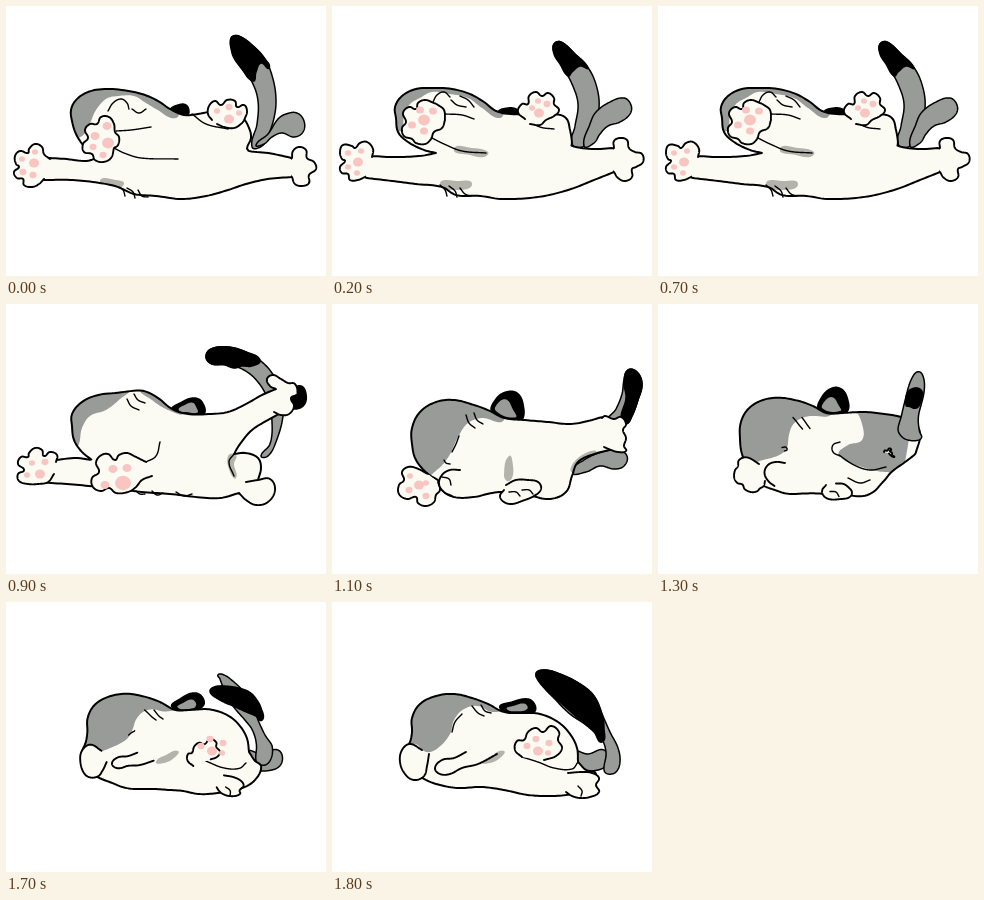
These frames come from a looping animation (320 px wide and 270 px high, 1.9 s). An HTML page with a canvas:

```html
<!DOCTYPE html>
<html lang="en">
<head>
<meta charset="utf-8">
<title>Rolling cat</title>
<style>
html, body { margin: 0; width: 100%; height: 100%; overflow: hidden; background: #fff; }
canvas { display: block; width: 320px; height: 270px; }
</style>
</head>
<body>
<canvas id="stage"></canvas>
<script>
// Part kinds by first letter: G grey, K black, B body, H body patch, S shade,
// P paw (open outline), D pads (x,y,radius), L ink line.
const reach = {
  Gtail: '246,141 251,118 252,95 246,76 235,62 227,50 225,38 226,31 233,30 246,39 259,53 267,73 270,94 268,112 262,130 256,140',
  Ktip: '225,32 232,30 246,39 258,52 263,62 255,57 250,66 247,75 235,61 226,45',
  Grump: '250,139 262,128 272,113 280,108 291,107 298,115 297,126 288,131 276,127 266,131 258,138',
  Kear: '164,104 172,99 180,99 183,106 180,110 168,108',
  B: '66,115 65,104 70,94 82,86 98,83 116,84 136,88 152,95 164,103 178,109 192,108 206,106 236,112 243,122 245,132 241,142 243,145 262,147 286,152 286,152 290,160 286,171 286,171 262,173 240,178 222,184 200,190 176,193 150,190 128,188 112,181 94,177 66,174 38,174 38,174 30,160 42,152 42,152 60,153 80,155 91,152 91,152 78,140 70,128',
  Hhead: '66,130 60,100 80,80 120,80 170,98 170,112 150,103 140,97 128,90 112,90 100,93 90,104 85,115 80,126 72,132',
  Sarm: '94,175 110,174 118,178 108,182',
  Larm: '110,125 125,124 145,121',
  Lelbow: '108,142 118,147 135,152 172,153',
  Leye: '102,105 107,97 115,93 121,97 123,103',
  Lcheek: '126,103 133,107 140,103',
  Lthigh: '186,108 200,118 222,123',
  Lfur1: '112,181 117,184 119,190',
  Lfur2: '121,182 127,186 129,192',
  Lfur3: '132,184 136,190 142,191',
  P1: '44,153 38,148 36,141 29,138 23,143 22,147 14,145 9,150 10,158 13,161 8,166 11,172 17,173 18,179 26,181 33,178 38,173',
  D1: '28,157,5 16,153,3 29,146,3 17,166,3.5 27,169,3.5',
  P2: '108,142 112,139 113,131 109,126 108,118 103,111 95,111 91,118 84,118 79,124 82,132 77,138 78,146 86,148 89,154 97,156 105,152 108,142',
  D2: '102,137,6 101,120,4.5 89,130,4.5 87,141,3.5 97,149,3.5',
  P3: '286,152 287,145 293,141 300,144 301,152 308,156 310,163 303,169 303,177 296,180 289,178 286,171',
  P4: '206,114 202,108 203,100 209,95 215,99 221,94 229,95 231,101 238,99 241,105 239,112 236,117 228,122 218,121 211,118',
  D4: '223,113,5 211,105,3 223,101,3.5 233,107,3'
};

const stretch = {
  Gtail: '240,138 243,120 246,98 240,78 230,60 222,46 222,38 229,36 243,48 257,63 265,82 267,102 262,122 252,140',
  Ktip: '222,38 229,36 243,48 256,62 248,60 240,66 236,70 228,58 222,48',
  Grump: '252,140 258,118 264,106 278,96 292,92 299,99 298,108 288,116 276,120 268,128 262,137',
  Kear: '166,107 176,102 186,104 188,110 176,111',
  B: '64,112 63,101 70,90 84,83 102,82 120,83 138,88 152,96 164,105 178,108 196,108 222,108 234,112 238,124 240,136 240,140 262,143 282,142 282,142 288,150 282,166 282,166 262,174 236,184 206,191 170,193 148,190 124,189 110,181 84,178 52,174 34,172 34,172 28,160 40,150 40,150 60,151 88,150 104,147 104,147 92,144 76,136 66,126',
  Hhead: '64,124 56,100 80,76 120,78 170,100 168,112 150,102 136,92 118,88 100,86 88,92 78,98 72,110 70,124',
  Sarm: '108,178 126,175 140,178 126,184',
  Selbow: '122,143 140,142 156,146 152,151 138,149',
  Larm: '113,108 130,109 142,113',
  Lelbow: '100,132 112,138 130,145 154,147',
  Leye: '101,96 105,89 112,86 118,91',
  Lcheek: '119,94 125,99 134,101',
  Lbrow: '128,90 136,94 142,101',
  Lthigh: '194,113 208,121 222,123',
  Lfur1: '108,179 113,184 115,190',
  Lfur2: '117,180 123,185 125,191',
  Lfur3: '128,182 133,188 139,190',
  P1: '40,151 41,143 35,136 28,137 23,142 20,140 11,139 8,146 10,153 13,155 8,161 10,167 16,168 18,174 26,174 33,171',
  D1: '26,156,5 16,147,3 29,145,3 16,161,3 25,167,3',
  P2: '113,114 112,104 106,99 102,97 93,94 86,97 84,103 77,101 71,107 74,116 70,122 72,130 80,133 84,137 93,138 99,133 102,126 110,122 113,114',
  D2: '92,114,6 101,105,4 88,104,4 80,119,4 92,125,4',
  P3: '282,142 282,135 288,132 295,134 297,142 303,146 310,148 311,156 304,161 300,163 300,171 293,175 286,172 282,166',
  P4: '193,113 186,106 190,98 196,98 197,90 204,86 210,90 216,87 222,92 222,98 227,104 222,110 214,114 208,119 198,118',
  D4: '207,107,5 200,102,3 206,95,3 215,98,3.5'
};

const kick = {
  Gtail: '255,152 264,140 266,118 262,96 252,78 238,66 222,61 206,60 200,53 205,45 222,43 240,48 256,58 268,72 276,90 277,112 270,138 262,152',
  Ktip: '200,53 205,45 222,43 240,48 254,56 246,62 236,62 228,64 216,60 206,60',
  Kend: '280,100 286,86 295,82 300,90 298,101 288,105',
  Kear: '166,107 176,98 188,94 196,98 198,110 186,111',
  Gear: '172,106 179,100 187,98 191,103 192,109 182,109',
  B: '66,122 66,110 76,98 92,91 110,89 126,87 138,87 152,94 166,105 182,110 204,110 222,108 240,100 256,91 270,85 270,85 285,88 280,106 280,106 262,116 246,126 234,140 228,150 228,150 240,149 252,154 255,164 252,176 252,176 256,182 246,194 233,189 233,189 214,194 190,193 165,190 136,188 104,184 60,180 28,178 28,178 30,160 50,156 50,156 70,154 86,156 86,156 76,148 68,136',
  Hhead: '66,142 56,110 80,84 112,84 124,84 114,95 100,106 84,112 76,124 72,142',
  Hback: '134,84 150,86 176,109 162,106 146,96',
  Ship: '222,152 230,151 228,160 230,174 224,168',
  Larm: '140,158 150,152 154,138',
  Leye: '121,95 125,102 133,106',
  Lbrow: '128,90 132,96 139,99',
  Lthigh: '228,150 223,158 228,172',
  Lfur1: '130,187 134,190 139,190',
  Lfur2: '146,187 151,191 157,189',
  Lfur3: '170,188 178,192 186,190',
  P1: '50,158 51,151 44,148 38,152 36,146 29,144 23,149 22,153 15,153 12,160 18,166 12,170 13,177 22,180 32,180 42,178 48,170',
  D1: '34,170,5 26,159,3 39,158,3.5 21,171,3',
  P2: '140,158 128,152 121,149 113,151 109,156 102,150 94,152 90,159 93,168 86,174 87,183 95,187 103,184 110,189 122,188 130,183 136,176 146,172',
  D2: '117,179,8 107,165,4.5 121,164,4.5 99,181,4.5',
  P3: '240,178 252,176 264,175 269,186 262,198 250,201 240,196 233,189',
  P4: '270,85 264,82 261,75 267,71 275,75 282,79 289,80 291,90 285,94 288,102 283,110 275,111 268,108'
};

const flop = {
  Gtail: '276,118 284,105 290,90 292,76 296,66 305,68 310,80 306,96 300,112 294,120',
  Ktip: '292,78 296,66 305,68 310,80 306,96 300,112 294,120 289,114 294,94',
  Grump: '240,168 252,156 270,148 286,146 295,152 292,162 282,165 268,162 254,168',
  Kear: '160,108 164,95 174,88 185,89 191,100 190,116 180,117',
  Gear: '163,107 167,97 175,95 181,104 184,114',
  B: '80,140 80,124 88,108 104,98 122,96 142,101 158,107 172,114 192,116 216,118 238,120 256,117 270,113 270,113 286,122 278,146 278,146 262,150 246,158 240,172 234,188 218,195 200,192 176,188 160,189 142,193 122,193 110,186 108,178 96,170 84,156',
  Hhead: '80,150 70,110 110,86 160,100 172,116 150,114 136,119 126,133 117,152 106,165 92,172',
  Ship: '172,170 177,152 181,162 180,174 175,177',
  Srump: '240,168 242,158 256,148 264,148 250,160',
  Leye: '120,148 124,140 127,132',
  Lcheek: '134,111 137,119 143,124',
  Lbrow: '142,109 145,116 151,120',
  Lnose: '112,156 114,159 118,160',
  P1: '96,170 84,164 76,163 70,168 72,176 67,181 67,190 75,195 84,193 86,199 94,202 102,198 104,191 108,186 106,178',
  D1: '87,181,5 78,172,3 94,179,3 77,186,3.5 94,192,3.5',
  P2: '128,166 118,166 110,171 107,180 112,188 120,192',
  Lwrist: '110,173 117,175 119,181',
  P3: '174,181 184,176 196,176 206,178 209,185 202,192 190,197 180,200 172,198 168,192 172,186',
  Ltoe1: '177,188 184,188 188,192',
  Ltoe2: '190,186 197,186 201,190',
  P4: '270,114 273,112 282,115 289,113 294,120 291,126 294,134 292,142 294,147 286,148 279,146 272,143'
};

const curl = {
  Kear: '162,104 164,90 172,80 182,80 188,88 189,98 178,102',
  Gear: '165,103 168,93 175,89 180,95 182,101',
  B: '84,130 86,112 96,99 114,92 136,92 152,97 164,104 176,102 196,98 214,100 228,110 236,126 238,146 232,166 218,180 204,185 188,190 172,188 156,191 136,190 118,186 108,178 92,172 86,160 84,146',
  Hhead: '80,150 74,100 120,80 170,95 176,104 160,108 146,112 136,120 134,132 136,146 126,150 110,146 96,146 84,160',
  Hrump: '172,96 240,90 246,164 228,168 204,163 181,151 190,141 204,136 204,120 196,106',
  Leye: '128,139 134,142 133,154 126,162',
  Lcheek: '136,116 142,119 146,126',
  Lbrow: '146,118 151,122 153,129',
  Larc: '182,152 175,148 175,141 182,138',
  Lthigh: '181,151 196,161 212,166 228,163',
  Lfoot: '190,174 202,179 212,176',
  P1: '106,150 98,144 89,147 86,156 84,166 90,173 100,178 108,176',
  P2: '126,152 118,150 110,151 106,158 109,167 113,172',
  P4: '182,182 174,176 173,166 180,158 190,156',
  P3: '182,178 187,186 182,196 174,199 168,196 161,193 158,184 164,176',
  Ltoe1: '167,187 172,188 174,193',
  Gtail: '206,140 203,122 205,100 210,84 219,71 226,70 227,80 222,98 218,112 216,128 222,142 230,150 216,151',
  Ktip: '204,124 205,100 210,84 219,71 226,70 227,80 222,98 217,110 210,116'
};

const unroll = {
  Grump: '240,150 256,152 272,148 276,160 266,168 246,166',
  Gtail: '272,168 274,150 268,134 256,124 238,112 222,96 208,80 204,72 212,68 228,72 248,82 262,94 270,112 278,130 286,146 288,160 284,170 276,172',
  Ktip: '204,72 212,68 228,72 248,82 262,94 270,112 272,126 270,140 262,130 248,118 230,102 214,88',
  Kear: '168,106 180,100 196,97 203,103 202,110 186,112',
  Gear: '174,107 182,103 193,101 196,107 186,110',
  B: '80,130 80,116 88,102 104,94 122,92 140,96 156,102 172,110 190,111 208,112 226,120 238,132 245,146 246,160 246,160 254,168 264,172 256,186 240,192 220,194 196,193 172,188 150,185 126,186 108,183 94,178 86,172 80,160 72,152 78,140',
  Hhead: '76,142 70,100 100,86 140,90 172,106 160,110 146,104 132,107 122,118 118,132 106,146 94,150 84,142',
  Sarm: '150,160 160,153 172,149 168,156 158,161',
  Leye: '120,130 123,120 130,112',
  Lcheek: '140,104 146,111 152,114',
  Lbrow: '149,103 153,109 159,111',
  P1: '90,148 78,142 70,148 68,160 73,172 82,178 92,174 95,164 97,152',
  P2: '134,150 122,156 110,158 103,166 108,172 118,172 130,166 146,162 165,152',
  P3: '236,171 250,170 260,171 267,176 264,183 267,190 258,195 248,196 240,194 234,190',
  Ltoe1: '246,184 250,189 249,194',
  Lthigh: '190,155 206,160 222,166 240,167 246,160',
  P4: '190,155 183,148 185,139 192,138 196,130 204,126 211,130 219,124 227,130 226,138 230,146 224,154 212,158',
  D4: '206,149,5 195,144,3.5 204,137,3.5 217,141,3.5 216,151,3'
};

const keys = [[0, reach], [2, stretch], [7, stretch], [9, kick], [11, flop], [15, curl], [18, unroll]];
const STEP = 100, STEPS = 19, SAMPLES = 240;
const fills = { G: '#999b99', K: '#000', B: '#fbfaf3', P: '#fbfaf3', H: '#999b99', S: '#b3b3ac' };
const W = 320, H = 270;

const canvas = document.getElementById('stage');
const ctx = canvas.getContext('2d');
const ratio = window.devicePixelRatio || 1;
canvas.width = W * ratio;
canvas.height = H * ratio;

const lerp = (a, b, t) => a + (b - a) * t;
const mix = (a, b, t) => a.map((p, i) => p.map((v, j) => lerp(v, b[i][j], t)));
const dist = (a, b) => Math.hypot(b[0] - a[0], b[1] - a[1]);
const parse = text => text.split(' ').map(p => p.split(',').map(Number));

// Smooth curve through the points; a repeated point makes a corner.
function smooth(pts, closed) {
  const n = pts.length;
  const at = i => closed ? pts[(i + n) % n] : pts[Math.max(0, Math.min(n - 1, i))];
  const tangent = i => {
    const a = at(i - 1), b = at(i + 1), d = dist(a, b) || 1;
    return [(b[0] - a[0]) / d, (b[1] - a[1]) / d];
  };
  const out = [pts[0]];
  for (let i = 0; i < (closed ? n : n - 1); i++) {
    const p = at(i), q = at(i + 1), h = dist(p, q) * 0.36;
    if (!h) continue;
    const u = tangent(i), v = tangent(i + 1);
    for (let s = 1; s <= 12; s++) {
      const t = s / 12, r = 1 - t;
      out.push([0, 1].map(k => r * r * r * p[k] + 3 * r * r * t * (p[k] + u[k] * h) +
        3 * r * t * t * (q[k] - v[k] * h) + t * t * t * q[k]));
    }
  }
  return out;
}

// Even spacing lets any two outlines blend.
function resample(pts) {
  const len = [0];
  for (let i = 1; i < pts.length; i++) len.push(len[i - 1] + dist(pts[i - 1], pts[i]));
  const total = len[len.length - 1], out = [];
  for (let s = 0, i = 1; s <= SAMPLES; s++) {
    const l = total * s / SAMPLES;
    while (i < pts.length - 1 && len[i] < l) i++;
    const t = (l - len[i - 1]) / (len[i] - len[i - 1] || 1);
    out.push([0, 1].map(k => lerp(pts[i - 1][k], pts[i][k], t)));
  }
  return out;
}

for (const pose of new Set(keys.map(k => k[1]))) {
  for (const id in pose) {
    const pts = parse(pose[id]);
    pose[id] = id[0] === 'D' ? pts : resample(smooth(pts, !'PL'.includes(id[0])));
  }
}

function blend(a, b, t) {
  const near = t < 0.5 ? a : b, out = {};
  for (const id in near) {
    const same = a[id] && b[id] && a[id].length === b[id].length;
    out[id] = same ? mix(a[id], b[id], t) : near[id];
  }
  return out;
}

function poseAt(step) {
  let i = keys.length - 1;
  while (keys[i][0] > step) i--;
  const [start, a] = keys[i], next = keys[i + 1];
  return next ? blend(a, next[1], (step - start) / (next[0] - start)) : a;
}

function trace(pts) {
  ctx.beginPath();
  pts.forEach(p => ctx.lineTo(p[0], p[1]));
}

function fill(id, pts) {
  trace(pts);
  ctx.fillStyle = fills[id[0]];
  ctx.fill();
}

function ink(pts, width) {
  trace(pts);
  ctx.lineWidth = width;
  ctx.stroke();
}

function drawBody(pose) {
  fill('B', pose.B);
  ctx.save();
  ctx.clip();
  for (const id in pose) if ('HS'.includes(id[0])) fill(id, pose[id]);
  ctx.restore();
  ink(pose.B, 2);
}

function drawPads(pads) {
  ctx.fillStyle = '#f9c5c1';
  for (const [x, y, r] of pads) {
    ctx.beginPath();
    ctx.ellipse(x, y, r, r * 0.9, 0, 0, Math.PI * 2);
    ctx.fill();
  }
}

function draw(step) {
  const pose = poseAt(step);
  const pull = step > 2 && step < 7 ? 1 + 0.024 * Math.sin(Math.PI * (step - 2) / 5) : 1;
  ctx.setTransform(ratio, 0, 0, ratio, 0, 0);
  ctx.fillStyle = '#fff';
  ctx.fillRect(0, 0, W, H);
  ctx.translate(W / 2, 0);
  ctx.scale(pull, 1);
  ctx.translate(-W / 2, 0);
  ctx.strokeStyle = '#000';
  ctx.lineCap = ctx.lineJoin = 'round';
  for (const id in pose) {
    const kind = id[0], pts = pose[id];
    if (kind === 'B') drawBody(pose);
    else if (kind === 'D') drawPads(pts);
    else if (kind === 'L') ink(pts, 1.4);
    else if ('GKP'.includes(kind)) {
      fill(id, pts);
      ink(pts, kind === 'P' ? 1.9 : 1.5);
    }
  }
}

let shown = -1;
function tick() {
  const step = Math.floor(performance.now() / STEP) % STEPS;
  if (step !== shown) draw(shown = step);
  requestAnimationFrame(tick);
}
tick();
</script>
</body>
</html>
```
